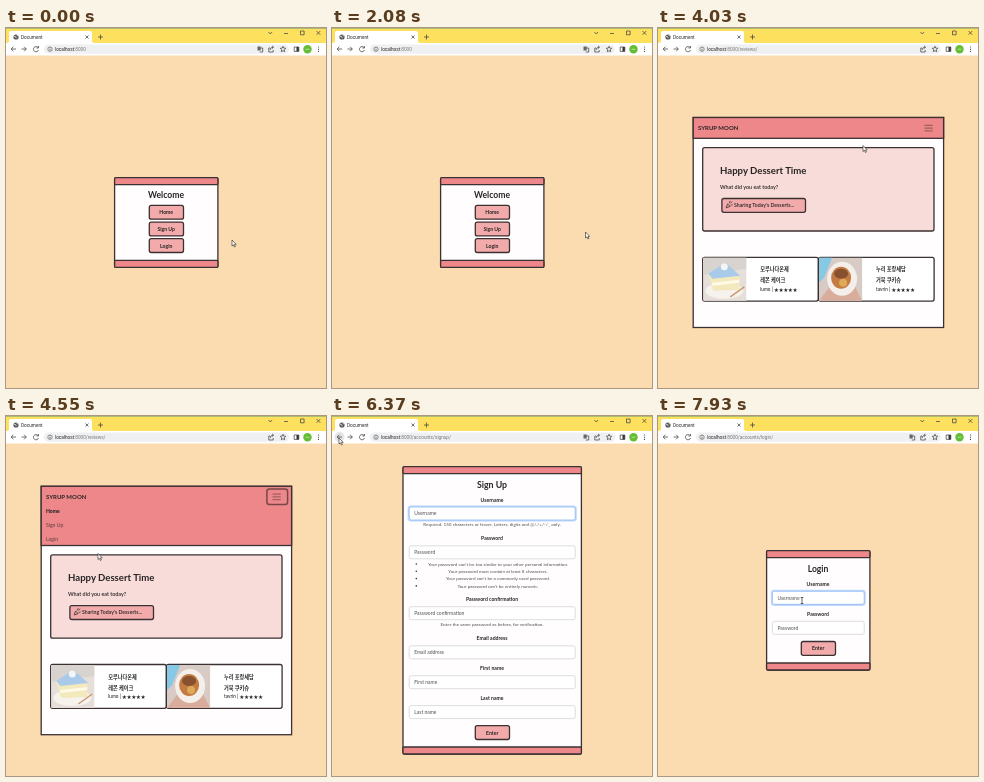
An HTML page for the animation above (8000 ms loop, 320x360 px).

```html
<!DOCTYPE html>
<html lang="en">
<head>
<meta charset="utf-8">
<title>Dessert reviews</title>
<style>
  html, body { margin: 0; width: 320px; height: 360px; overflow: hidden; background: #fadcb0; }
  svg { display: block; }
  text { font-family: Lato, "Noto Sans CJK KR", "Noto Sans CJK", sans-serif; fill: #292525; }
  .ui text { font-family: Roboto, sans-serif; }
  .ui path { fill: none; stroke: #444; stroke-width: .75; }
</style>
</head>
<body>
<svg id="stage" width="320" height="360" viewBox="0 0 320 360"></svg>
<script>
const LOOP = 8000, STEP = 130;
const INK = '#3b3032', ROSE = '#ed8789', PINK = '#f2abaa';

const rect = (x, y, w, h, fill, extra = '') =>
  `<rect x="${x}" y="${y}" width="${w}" height="${h}" fill="${fill}" ${extra}/>`;
const box = (x, y, w, h, fill, r = 2) =>
  rect(x, y, w, h, fill, `rx="${r}" stroke="${INK}" stroke-width="1.3"`);
const circle = (x, y, r, fill, extra = '') =>
  `<circle cx="${x}" cy="${y}" r="${r}" fill="${fill}" ${extra}/>`;
const path = (d, extra = '') => `<path d="${d}" ${extra}/>`;
const text = (s, x, y, size, weight = 400, extra = '') =>
  `<text x="${x}" y="${y}" font-size="${size}" font-weight="${weight}" ${extra}>${s}</text>`;
const mid = (s, x, y, size, weight, extra = '') =>
  text(s, x, y, size, weight, 'text-anchor="middle" ' + extra);
const move = (x, y, s) => `<g transform="translate(${x} ${y})">${s}</g>`;

// Browser window
function chrome(url, translate, loading, backHover) {
  const spot = loading ? '' : circle(10, 9, 2.6, '#555') +
    path('M8 8.2l1.8 .6 .4 1.4M10.5 7l1.6 1.2', 'style="stroke:#fff"');
  const reload = loading ? 'M28 19l4 4m0-4l-4 4' : 'M32 19.5A2.6 2.6 0 1 0 32.5 22M32.5 18v2h-2';
  return `<g class="ui">
    ${rect(0, 0, 320, 15, '#fee05f')}${rect(0, 0, 320, 1, '#aebc72')}
    ${rect(0, 15, 320, 12.5, '#fff')}
    ${path('M1 15Q3 15 3 13V5Q3 3 5 3H84Q86 3 86 5V13Q86 15 88 15Z', 'style="fill:#fff;stroke:none"')}
    ${spot}${text('Document', 15, 10.8, 4.7)}
    ${path('M79.5 7.5l3 3m0-3l-3 3M94.5 6.5v5m-2.5-2.5h5')}
    ${path('M262.5 4l1.8 2 1.8-2M278 5.5h4M294.5 3h3.6v3.8h-3.6ZM310.5 3l3.8 3.8m0-3.8l-3.8 3.8')}
    ${backHover ? circle(7.5, 21, 5, '#e4e5e6') : ''}
    ${path('M10 21H5.2m2.2-2.3L5.2 21l2.2 2.3M15.5 21h4.8m-2.2-2.3l2.2 2.3-2.2 2.3' + reload)}
    ${rect(38, 16.5, 245, 9.3, '#eff0f1', 'rx="4.6"')}
    ${circle(44, 21.2, 2.2, 'none', 'stroke="#666" stroke-width=".7"')}${path('M44 20.8v1.7M44 19.6v.5')}
    <text x="49" y="22.9" font-size="4.7">localhost<tspan fill="#777">:8000${url}</tspan></text>
    ${translate ? rect(251.5, 18.5, 3.2, 4, '#666') + path('M254.5 20h2.2v4h-3') : ''}
    ${path('M264 20h-1.2v4h4.4v-2M264.2 22q0-2.8 3-2.8M266 17.8l1.6 1.4-1.6 1.4')}
    ${path('M277 18.3l.8 1.8 2 .2-1.5 1.4.4 2-1.7-1-1.7 1 .4-2-1.5-1.4 2-.2Z')}
    ${path('M288.2 19h4.6v4.4h-4.6Z')}${rect(290.5, 19, 2.3, 4.4, '#333')}
    ${circle(301.5, 21.2, 4.2, '#65bd36')}${rect(299.6, 20.8, 3.8, .8, '#c7e8ad')}
    ${[19, 21.2, 23.4].map(y => circle(312.5, y, .6, '#444')).join('')}
  </g>`;
}

// Shared page parts
const panel = (x, y, w, h) => box(x, y, w, h, '#fffdfd') +
  [y, y + h - 7].map(top => box(x, top, w, 7, ROSE, 1)).join('');
const button = (label, y) => box(143.3, y, 34.2, 13.8, PINK) + mid(label, 160.2, y + 8.8, 5.1, 700);

function field(name, x, y, w, focus) {
  const glow = focus ? rect(x - .7, y - .7, w + 1.4, 14.4, 'none', 'rx="2.4" stroke="#c0d9fc" stroke-width="1.8"') : '';
  return mid(name, 160, y - 5.4, 5.1, 700) + glow +
    rect(x, y, w, 13, '#fff', `rx="2" stroke="${focus ? '#8db8f2' : '#d3d6da'}" stroke-width=".8"`) +
    text(name, x + 5, y + 8.3, 5, 400, 'fill-opacity=".8"');
}

const welcome = () => panel(108.6, 149.6, 103.3, 89.8) +
  mid('Welcome', 160, 170.3, 8.6, 700) +
  button('Home', 177.4) + button('Sign Up', 194.1) + button('Login', 210.7);

const login = () => panel(108.6, 134.6, 103.3, 119.4) +
  mid('Login', 160, 156, 8.6, 700) +
  field('Username', 114.4, 175.3, 91.8, true) +
  field('Password', 114.4, 205.3, 91.8) + button('Enter', 225.5);

function signup() {
  const hint = (s, x, y) => mid(s, x, y, 4.6, 400, 'fill-opacity=".8"');
  const rules = [
    "Your password can't be too similar to your other personal information.",
    'Your password must contain at least 8 characters.',
    "Your password can't be a commonly used password.",
    "Your password can't be entirely numeric."
  ];
  const names = [['Username', 91], ['Password', 129.8], ['Password confirmation', 190.7],
    ['Email address', 229.8], ['First name', 259.7], ['Last name', 289.6]];
  return panel(71, 50.6, 178.4, 287.4) + mid('Sign Up', 160, 71.5, 8.8, 700) +
    names.map(([name, y], i) => field(name, 77.2, y, 166, i === 0)).join('') +
    hint('Required. 150 characters or fewer. Letters, digits and @/./+/-/_ only.', 160, 110) +
    rules.map((s, i) => circle(84.3, 148 + i * 7.3, .8, INK) + hint(s, 166, 149.6 + i * 7.3)).join('') +
    hint('Enter the same password as before, for verification.', 160, 210.2) + button('Enter', 309.7);
}

// Review list
const cake = () => rect(0, 0, 43, 43, '#e6dfd9') + path('M0 0H43V11L0 17Z', 'fill="#d8d3cf"') +
  `<ellipse cx="21" cy="33" rx="19" ry="8" fill="#f6f2ed"/>` +
  path('M5 17L22 6 36 18V32L10 33Z', 'fill="#f4e8bd"') +
  path('M5 16L22 5 37 18 9 21Z', 'fill="#a9cbe9"') +
  path('M9 25L36 22v3L9 28Z', 'fill="#fff9e8"') + circle(21, 9, 3.5, '#f4f6f5') +
  path('M27 39L41 29', 'stroke="#c99b70" stroke-width="1.5"');
const cookie = () => rect(0, 0, 43, 43, '#d8cbc5') + path('M0 0H13L5 20 0 25Z', 'fill="#85c9e4"') +
  path('M0 43L12 27 36 29 43 43Z', 'fill="#d9ad9c"') +
  `<ellipse cx="23" cy="21" rx="15" ry="17" fill="#f5efeb"/>` +
  `<ellipse cx="22" cy="20" rx="10" ry="11" fill="#c47b42"/>` +
  `<ellipse cx="22" cy="16" rx="7" ry="5" fill="#87502e"/>` + circle(24, 25, 4, '#dfaa57');

const review = (x, photo, shop, dish, user) => box(x, 119, 115.6, 43.8, '#fff') +
  move(x + .6, 119.5, photo()) +
  text(shop, x + 57.5, 133.2, 5.2, 700) + text(dish, x + 57.5, 144.2, 5.2, 700) +
  text(user + ' | ★★★★★', x + 57.5, 152.6, 4.7, 500);

function reviews(open, focus) {
  const top = 89.5 - 21 * open, head = 20.8 + 42 * open;
  const body = box(9.5, 9.4, 231.3, 83.3, '#f8dcd9') +
    text('Happy Dessert Time', 26.8, 35.5, 9.6, 700) +
    text('What did you eat today?', 26.8, 50.5, 5.4, 600) +
    box(28.7, 60.2, 83.6, 13.8, PINK) +
    path('M33 69.5l1.4-4 2.6 2.6ZM36 65l1-2.4M37.5 67l2-.6M37.4 65l1.5-1.8', `fill="none" stroke="${INK}" stroke-width=".8"`) +
    text("Sharing Today's Desserts...", 40.8, 68.9, 5.2, 600) +
    review(9.5, cake, '모루나다온제', '레몬 케이크', 'lumo') +
    review(125.3, cookie, '누리 포랑세담', '거북 쿠키슈', 'tavrin');
  const nav = text('Home', 4.8, 26.8, 5.1, 800) +
    text('Sign Up', 4.8, 40.7, 5.1, 400, 'fill-opacity=".75"') +
    text('Login', 4.8, 54.5, 5.1, 400, 'fill-opacity=".75"');
  return move(35.2, top,
    box(0, 0, 250.4, 210 + 42 * open, '#fffdfd', 0) + box(0, 0, 250.4, head, ROSE, 0) +
    text('SYRUP MOON', 4.8, 12.9, 6, 700) +
    (focus ? rect(225.7, 2.7, 20.7, 15.5, 'none', 'rx="2.5" stroke="#76484a" stroke-width="1.5"') : '') +
    path('M231.3 7.8h8.3m-8.3 2.8h8.3m-8.3 2.8h8.3', 'stroke="#78494b" stroke-width=".8"') +
    `<clipPath id="fold"><rect y="18" width="250" height="${head - 18}"/></clipPath>` +
    `<g clip-path="url(#fold)">${open > 0 ? nav : ''}</g>` + move(0, head, body));
}

// Pointer: time, x, y
const TRACK = [
  [0, 226, 212], [910, 232, 211], [1820, 250, 205], [2080, 253.5, 204], [2730, 163, 185],
  [3250, 163, 185], [4030, 205, 117.5], [4290, 270, 100], [4330, 270, 100], [4550, 92, 137.5],
  [4810, 50, 107], [5590, 50, 107], [6370, 7, 22], [6500, 7, 22], [7150, 53, 121.7],
  [7410, 53, 121.7], [7930, 144, 184.5], [LOOP, 144, 184.5]
];
const CURSORS = {
  arrow: path('M0 0V6L1.4 4.8 2.4 7 3.4 6.5 2.4 4.4H4.2Z', 'fill="#fff" stroke="#222" stroke-width=".6"'),
  hand: path('M0 0Q.7-.6 1.2 0V2.6L4 3.2Q4.6 3.5 4.4 4.6L3.7 7H.6L-1.6 4.2Q-1.2 3.3 0 4Z', 'fill="#fff" stroke="#222" stroke-width=".6"'),
  beam: path('M-1.3-3H1.3M0-3V3M-1.3 3H1.3', 'stroke="#222" stroke-width=".7"')
};

function pointerAt(t) {
  const i = Math.max(1, TRACK.findIndex(k => k[0] > t));
  const [t0, x0, y0] = TRACK[i - 1], [t1, x1, y1] = TRACK[i];
  const p = (t - t0) / (t1 - t0), e = p * p * (3 - 2 * p);
  return [x0 + (x1 - x0) * e, y0 + (y1 - y0) * e];
}

const within = (v, a, b) => v >= a && v < b;

function cursorKind(page, x, y) {
  const hot = page === 'welcome' ? within(x, 143, 178) && within(y, 177, 225)
    : page === 'reviews' && within(x, 38, 60) && within(y, 88, 126);
  if (hot) return 'hand';
  return page === 'login' && within(x, 114, 206) && within(y, 175, 189) ? 'beam' : 'arrow';
}

const pageAt = t => t < 3120 ? 'welcome' : t < 4940 ? 'reviews' : t < 6500 ? 'signup' : t < 7410 ? 'reviews' : 'login';
const PATHS = { welcome: '', reviews: '/reviews/', signup: '/accounts/signup/', login: '/accounts/login/' };
const LOADS = [[2990, 3120], [4810, 4940], [7150, 7410]];

function draw(t) {
  const page = pageAt(t), [x, y] = pointerAt(t);
  const unfold = Math.min(1, Math.max(0, (t - 4320) / 350));
  const open = 1 - (1 - unfold) ** 2.3;
  const view = { welcome, login, signup, reviews: () => reviews(open, within(t, 4320, 4940)) }[page]();
  const loading = LOADS.some(([a, b]) => within(t, a, b));
  stage.innerHTML = rect(0, 0, 320, 360, '#fadcb0') +
    chrome(PATHS[page], page !== 'reviews', loading, x < 13 && y < 27) +
    view + move(x, y, CURSORS[cursorKind(page, x, y)]);
}

const stage = document.getElementById('stage');
let shown = -1;
function tick() {
  const t = Math.floor(performance.now() % LOOP / STEP) * STEP;
  if (t !== shown) draw(shown = t);
  requestAnimationFrame(tick);
}
tick();
</script>
</body>
</html>
```
